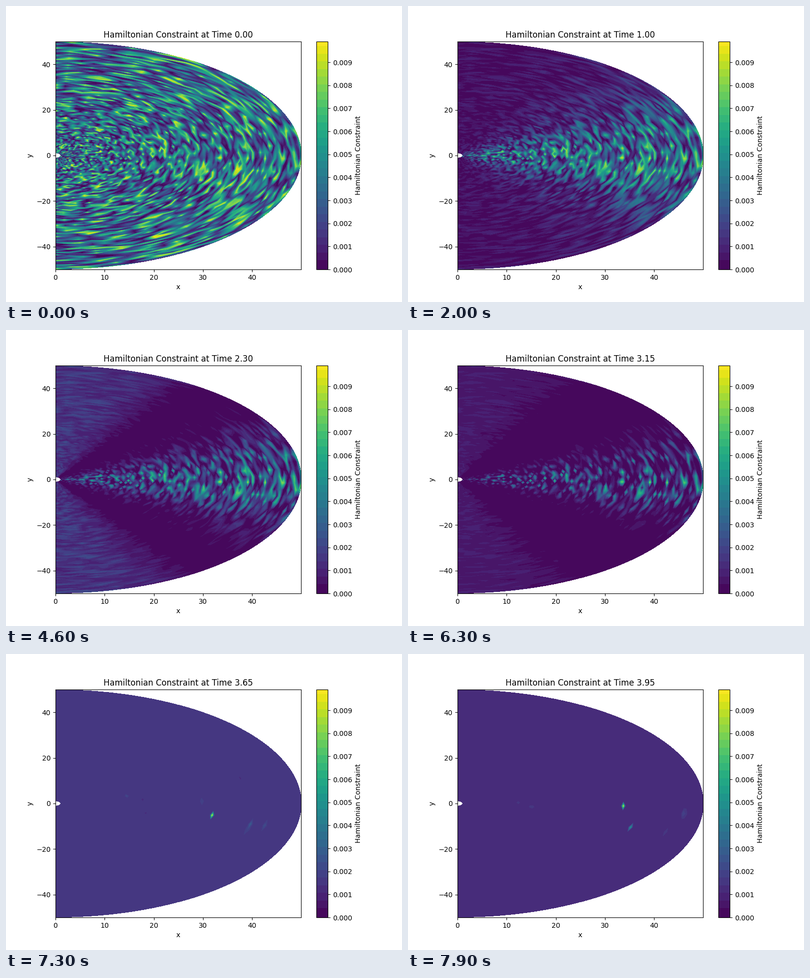
Write a matplotlib script that moves like this. It is 800 by 600 pixels and loops after 8 s.

```python
import numpy as np
import matplotlib.pyplot as plt
from matplotlib.animation import FuncAnimation
from matplotlib.cm import ScalarMappable
from matplotlib.colors import BoundaryNorm, ListedColormap

FRAMES, INTERVAL, DT = 80, 100, 0.05
NR, NTH = 100, 50
R_MIN, R_MAX = 1.0, 50.0
W, H = 496, 462
BLOWUP = 3.5  # time at which the instability swamps the field

levels = np.arange(0, 0.01, 0.0001)
VMAX = levels[-1]
bounds = np.concatenate([[0], np.linspace(0.0004, 0.0097, 29), [VMAX]])
colors = plt.get_cmap("viridis")((bounds[1:] + bounds[:-1]) / 2 / VMAX)
bands = (colors * 255).round().astype(np.uint8)

radius = np.linspace(R_MIN, R_MAX, NR)[:, None]
theta = np.linspace(-np.pi / 2, np.pi / 2, NTH)[None, :]
sin2 = np.sin(theta) ** 2
x_max = R_MAX * np.cos(theta[0, NTH // 2])
noise = np.random.default_rng(11).random((NR, NTH)) ** 1.6


def smoothstep(a, b, x):
    s = np.clip((x - a) / (b - a), 0, 1)
    return s * s * (3 - 2 * s)


def decaying(t):
    """Noise that dies out away from the equator and sharpens with time."""
    floor = 0.12 * np.exp(-0.9 * t)
    weight = floor + (1 - floor) * np.exp(-3.1 * t * sin2)
    rim = 0.4 * np.exp((radius - R_MAX) / 0.5 - 0.7 * t) * min(t, 1)
    power = 1 + 0.013 * t ** 4 + 10 * max(0, t - 3.15)
    inner = 1 - 0.11 * t * (1 - radius / R_MAX)
    field = VMAX * np.maximum(weight, rim) * inner * noise ** power
    swell = 0.0018 * np.sin(np.pi * np.clip((t - 0.7) / 3.2, 0, 1)) ** 2
    return field + swell * smoothstep(0.6, 1, sin2) * (0.5 + 0.8 * noise)


def grid_coords(x, y):
    """Fractional grid position of a point in the plane."""
    i = (np.hypot(x, y) - R_MIN) / (R_MAX - R_MIN) * (NR - 1)
    j = (np.arctan2(y, x) / np.pi + 0.5) * (NTH - 1)
    return i, j


def spiked(t):
    """Flat background with two strong spikes and a few faint ones."""
    s = (t - 3.65) / 0.3
    base = 0.0017 - 0.0004 * s
    field = np.full((NR, NTH), base)
    rng = np.random.default_rng(round(t / DT))
    for _ in range(8):
        i = rng.integers(20, NR - 2)
        j = int(np.clip(rng.normal(NTH / 2, 2.5), 0, NTH - 1))
        field[i, j] = max(0, base + rng.normal(0, 0.0006))

    def spike(x, y, value):
        i, j = grid_coords(x, y)
        field[int(round(i)), int(round(j))] = value

    spike(39.5 - 4.5 * s, -9 - 1.5 * s, 0.0029 + 0.0023 * s)
    spike(31.6 + 2 * s, -5 + 4 * s, VMAX)
    return field


# Screen pixels mapped to polar grid cells
X, Y = np.meshgrid((np.arange(W) + 0.5) / W * x_max,
                   R_MAX - (np.arange(H) + 0.5) / H * 2 * R_MAX)
R = np.hypot(X, Y)
inside = (R >= R_MIN) & (R <= R_MAX)
gi, gj = grid_coords(X[inside], Y[inside])
I = np.minimum(gi.astype(int), NR - 2)
J = np.clip(gj.astype(int), 0, NTH - 2)
U, V = gi - I, gj - J
corner = I * NTH + J


def sample(field):
    """Piecewise linear lookup, each quad split along its flatter diagonal."""
    f = field.ravel()
    a, b = f[corner], f[corner + NTH]
    c, d = f[corner + 1], f[corner + NTH + 1]
    cross = np.where(U + V < 1, a + U * (b - a) + V * (c - a),
                     d + (1 - U) * (c - d) + (1 - V) * (b - d))
    main = np.where(U > V, a + U * (b - a) + V * (d - b),
                    a + V * (c - a) + U * (d - c))
    return np.where(np.abs(b - c) < np.abs(a - d), cross, main)


def render(t):
    field = decaying(t) if t < BLOWUP - DT / 2 else spiked(t)
    image = np.full((H, W, 4), 255, np.uint8)
    image[inside] = bands[np.digitize(sample(field), bounds[1:-1])]
    return image


fig, ax = plt.subplots(figsize=(8, 6), dpi=100)
scale = ScalarMappable(BoundaryNorm(bounds, len(bands)), ListedColormap(colors))
bar = fig.colorbar(scale, ax=ax, spacing="proportional", format="%.3f",
                   ticks=levels[::10])
bar.minorticks_off()
bar.set_label("Hamiltonian Constraint")
picture = ax.imshow(render(0), extent=(0, x_max, -R_MAX, R_MAX),
                    aspect="auto", interpolation="nearest")
ax.set_xlabel("x")
ax.set_ylabel("y")
title = ax.set_title("")


def update(k):
    t = k * DT
    picture.set_data(render(t))
    title.set_text(f"Hamiltonian Constraint at Time {t:.2f}")
    return picture, title


anim = FuncAnimation(fig, update, frames=FRAMES, interval=INTERVAL,
                     repeat=True, repeat_delay=0)
plt.show()
```
